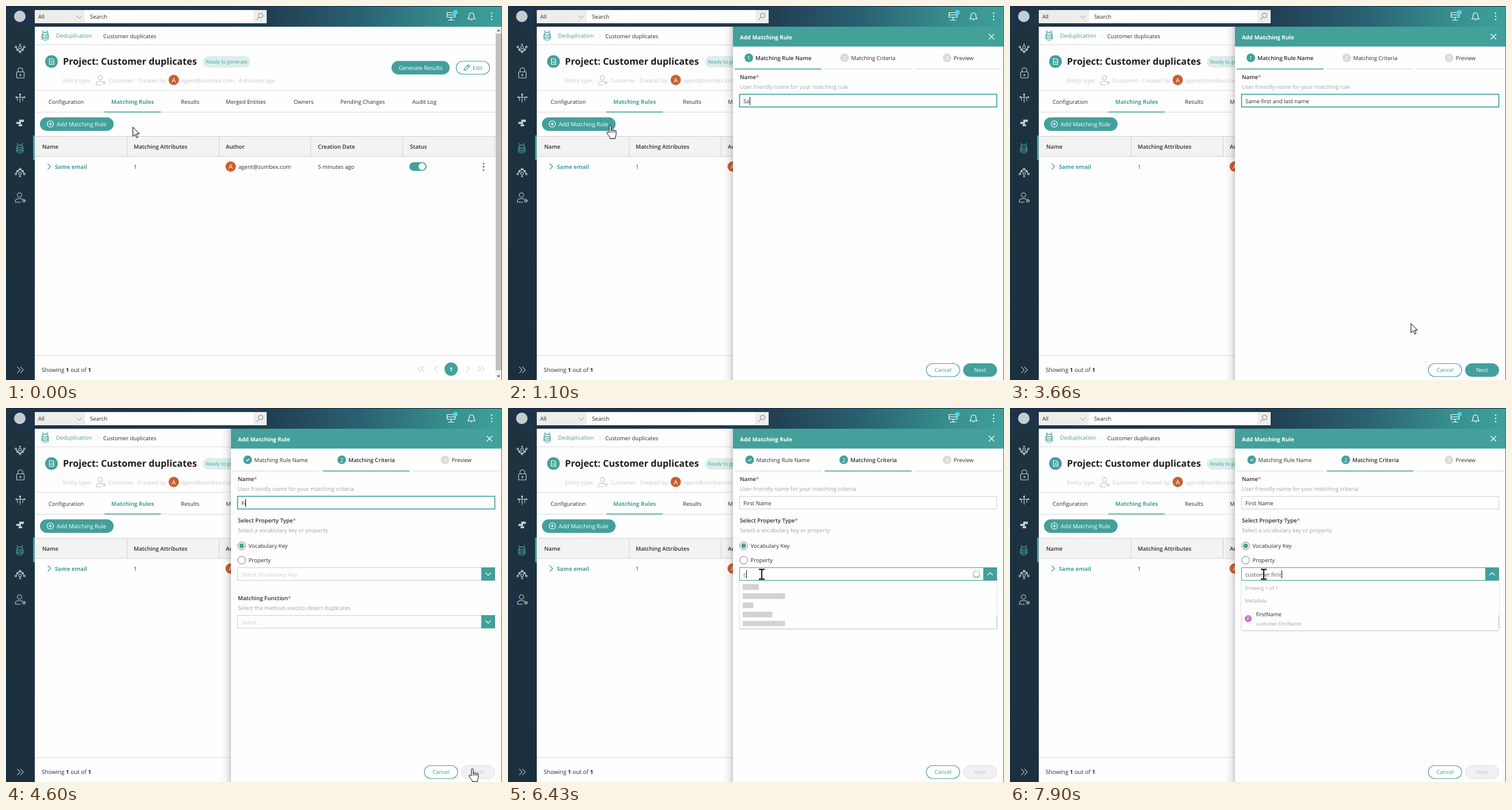
These frames come from a looping animation (862 by 650 pixels, 8000 ms). An HTML page:

```html
<!DOCTYPE html>
<html lang="en">
<head>
<meta charset="utf-8">
<title>Add Matching Rule</title>
<style>
html, body { margin: 0; width: 100%; height: 100%; overflow: hidden; background: #fefefe; }
svg { display: block; width: 862px; height: 650px; }
text { font: 9.6px "Open Sans", "Noto Sans", sans-serif; fill: #2d2d2d; white-space: pre; text-rendering: geometricPrecision; }
.b { font-weight: 600; font-size: 9.7px; }
.h { font-weight: 700; font-size: 9.7px; }
.sub { fill: #a3a3a3; }
.hint { fill: #cfcfcf; }
.meta { fill: #c9c9c9; }
.small { font-size: 8.5px; fill: #a0a0a0; }
.mid { text-anchor: middle; }
.teal { fill: #43a09a; }
.white { fill: #fff; }
.req { fill: #e8585c; }
.rule { stroke: #dcdcdc; }
.line { fill: none; stroke: #43a09a; stroke-width: 1.2; }
.icon { fill: none; stroke: #c9d0d4; stroke-width: 1.1; }
.icon .solid { fill: #c9d0d4; stroke: none; }
.w { fill: none; stroke: #fff; stroke-width: 1.2; }
.box { fill: #fefefe; stroke: #cfcfcf; }
</style>
</head>
<body>
<svg viewBox="0 0 862 650">
<defs>
  <linearGradient id="bar"><stop stop-color="#1e3246"/><stop offset=".52" stop-color="#213c50"/><stop offset=".72" stop-color="#296373"/><stop offset=".9" stop-color="#38918f"/><stop offset="1" stop-color="#3da09b"/></linearGradient>
  <linearGradient id="side" x2="0" y2="1"><stop stop-color="#1d3340"/><stop offset="1" stop-color="#1b2f3e"/></linearGradient>
  <filter id="shadow" x="-10%" y="-10%" width="120%" height="130%"><feDropShadow dx="0" dy="1" stdDeviation="1.5" flood-opacity=".25"/></filter>
  <linearGradient id="edge"><stop stop-color="#000" stop-opacity="0"/><stop offset=".6" stop-color="#000" stop-opacity=".05"/><stop offset="1" stop-color="#000" stop-opacity=".18"/></linearGradient>
  <g id="hive"><path d="M-2.500-5C-3-7-4-8-5.500-8M2.500-5C3-7 4-8 5.500-8"/><ellipse cy="-3" rx="5" ry="2.300"/><path d="M-5-3v3c0 3 10 3 10 0v-3M-5.500 0c-1 2-.5 3 0 3.500 2 2.200 9 2.200 11 0 .5-.5 1-1.500 0-3.500M-5.500 4v2.500c2 2.500 9 2.500 11 0V4"/></g>
  <g id="hub"><circle r="2.300"/><path d="M-7-1C-6 3-4 5 0 7.500 4 5 6 3 7-1"/><g class="solid"><circle cx="-7.500" cy="-1" r="1.500"/><circle cx="7.500" cy="-1" r="1.500"/><circle cx="-4.500" cy="4" r="1.400"/><circle cx="4.500" cy="4" r="1.400"/><circle cy="7.500" r="1.700"/><circle cy="-5" r="1"/></g></g>
  <g id="person"><circle cy="-4.500" r="3.800"/><path d="M-7 8V5.500C-7 1 3 1 5 3M-7 8H2"/></g>
  <g id="avatar"><circle r="9" fill="#c9602f"/><text class="white mid" y="4" style="font-size:11px">A</text></g>
  <g id="dots"><circle cy="-5.500" r="1.200"/><circle r="1.200"/><circle cy="5.500" r="1.200"/></g>
  <path id="chev" d="M-2.500-5 2.500 0-2.500 5"/>
  <g id="spin"><circle r="5.700" class="line" stroke-dasharray="15 1.600 1.600 1.600 1.600 1.600 1.600 1.600 1.600 1.600 1.600 1.600 1.600 1.600"/></g>
</defs>

<!-- page -->
<rect width="862" height="650" fill="#fefefe"/>
<rect width="862" height="36" fill="url(#bar)"/>
<rect y="36" width="50" height="614" fill="url(#side)"/>
<rect width="862" height="1" fill="#172230"/>
<circle cx="24" cy="18" r="10" fill="#c5cdd2"/>
<rect x="50" y="7" width="87" height="23" fill="#ededec"/>
<rect x="137" y="7" width="293" height="23" fill="#fefefe"/>
<rect x="430" y="7" width="23" height="23" fill="#ededec"/>
<text x="56" y="21.500" fill="#555">All</text><text x="146" y="22">Search</text>
<path d="M122.500 17l4.500 4.500 4.500-4.500" fill="none" stroke="#8a8a8a"/>
<g fill="none" stroke="#667b80"><circle cx="442.500" cy="16.500" r="4"/><path d="M439.500 19.500l-4 4.500"/></g>
<g class="w"><path d="M766.500 11.500h14v4h-14zM766.500 15.500h14v4h-14zM773.500 20v4M768 24.500h11"/>
<path d="M803 22.500h12c-2-1.500-1.500-4-2-7-.5-2.500-2-3.500-4-3.500s-3.500 1-4 3.500c-.5 3 0 5.500-2 7zM807.500 24.500h3"/></g>
<circle cx="781" cy="11" r="4" fill="#45d7ea"/>
<use href="#dots" x="844" y="18" fill="#fff"/>

<g class="icon">
  <use href="#hub" x="24.500" y="72"/>
  <rect x="18.500" y="114.500" width="13" height="10.500" rx="1"/><path d="M21 114v-3a4 3.500 0 0 1 8 0v3M23 120h4M25 118v4"/>
  <path d="M17 158.500h16M24.500 152v16M20 158v7M29 158v7"/><g class="solid"><circle cx="24.500" cy="154" r="1.700"/><circle cx="18" cy="158.500" r="1.500"/><circle cx="32" cy="158.500" r="1.500"/></g>
  <path class="solid" d="M23 197.500h8v4h-8zM18 201.500h8v3.500h-8zM22 205.500h6v3.500h-6z"/>
  <use href="#hub" transform="translate(24.500 291) scale(1 -1)"/>
  <use href="#person" x="23.500" y="333"/><circle cx="31" cy="338.500" r="2" stroke-dasharray="1.200 .5" stroke-width="2"/>
  <path d="M19.500 627l5 5.500-5 5.500M25 627l5 5.500-5 5.500"/>
</g>
<use href="#hive" class="line" x="24" y="247"/>
<rect x="47" y="225" width="3" height="43" class="teal"/>

<use href="#hive" class="line" x="68" y="51"/>
<text x="87" y="55" class="teal">Deduplication</text><use href="#chev" transform="translate(159.500 52) scale(.7)" class="icon"/><text x="169" y="55.500">Customer duplicates</text>
<path class="rule" d="M50 67.500h801M50 146.500h801M50 184.500h801M50 607.500h801"/>
<circle cx="79" cy="96.500" r="11" class="teal"/><path class="w" d="M75.500 91.500h5l2.500 2.500v7.500h-7.500zM77.500 96h4M77.500 98.500h4"/>
<text x="99" y="102" class="h" style="font-size:16.200px;fill:#1d1d1d">Project: Customer duplicates</text>
<rect x="342" y="87" width="82.500" height="20" rx="10" fill="#dbeeec"/><text x="347.500" y="100" class="small" style="fill:#43a09a">Ready to generate</text>
<text x="99" y="132.500" class="meta">Entity type:</text>
<g fill="none" stroke="#c4c4c4" stroke-width="1.200"><use href="#person" x="164" y="129"/><path d="M167 133.500h7M170.500 130v7"/></g>
<text x="178" y="132.500" class="meta">Customer</text><text x="229" y="132.500" class="meta">Created by:</text><use href="#avatar" x="291.500" y="128.500"/>
<text x="305" y="132.500" class="meta">agent@zumbex.com,</text><text x="404" y="132.500" class="meta">4 minutes ago</text>
<rect x="670" y="95.500" width="101" height="23.500" rx="11.800" class="teal"/><text x="720.500" y="111" class="white mid">Generate Results</text>
<rect x="782.500" y="96" width="58" height="22.500" rx="11.300" class="line"/><path class="line" d="M796 112l1-3.500 6.500-6.500 2.500 2.500-6.500 6.500zM802 103.500l2.500 2.500"/><text x="811" y="111" class="teal">Edit</text>

<text x="74" y="169.500">Configuration</text><text x="183" y="169.500" class="h teal">Matching Rules</text><text x="304" y="169.500">Results</text><text x="382" y="169.500">Merged Entities</text><text x="500" y="169.500">Owners</text><text x="581" y="169.500">Pending Changes</text><text x="706" y="169.500">Audit Log</text>
<rect x="171" y="183.500" width="98" height="1.600" class="teal"/>
<rect x="59" y="193.500" width="128" height="23.500" rx="11.800" class="teal"/><circle cx="77" cy="205" r="5.500" class="w"/><path class="w" d="M74 205h6M77 202v6"/><text x="88" y="209" class="white" style="font-size:9.900px">Add Matching Rule</text>

<path d="M50 226.500h799.500v35H50M210.500 226.500v35M370.500 226.500v35M529.500 226.500v35M689.500 226.500v35" fill="#f3f3f3" stroke="#d0d0d0"/>
<g class="head"><text x="63" y="247.500" class="b">Name</text><text x="222" y="247.500" class="b">Matching Attributes</text><text x="382" y="247.500" class="b">Author</text><text x="542" y="247.500" class="b">Creation Date</text><text x="702" y="247.500" class="b">Status</text></g>
<use href="#chev" class="line" x="75" y="279"/><text x="85" y="282.500" class="h teal">Same email</text><text x="222" y="282.500">1</text><use href="#avatar" x="390.500" y="279"/><text x="404" y="282.500">agent@zumbex.com</text><text x="542" y="282.500">5 minutes ago</text>
<rect x="701" y="271.500" width="30" height="15" rx="7.500" class="teal"/><circle cx="723" cy="279" r="6" fill="#fff"/>
<use href="#dots" x="830" y="279.500" fill="#444"/>

<text x="62" y="635.500" style="font-size:10px">Showing <tspan class="h">1</tspan> out of <tspan class="h">1</tspan></text>
<path d="M721 626l-5 5 5 5M727 626l-5 5 5 5M750 626l-5 5 5 5M800 626l5 5-5 5M820 626l5 5-5 5M826 626l5 5-5 5" fill="none" stroke="#c2c2c2"/>
<circle cx="773.500" cy="631" r="11.500" class="teal"/><text x="773.500" y="634.500" class="h white mid">1</text>
<rect x="851" y="36" width="11" height="614" fill="#f1f1f1"/><rect x="851" y="48" width="10" height="585" fill="#c1c1c1"/>
<path d="M853 44l3-3.500 3 3.500zM853 642l3 3.500 3-3.500z" fill="#666"/>

<!-- side panel -->
<g id="panel">
  <rect x="373" y="36" width="18" height="614" fill="url(#edge)"/>
  <rect x="391" y="36" width="471" height="614" fill="#fefefe"/><rect x="391" y="36" width="471" height="34.500" class="teal"/>
  <text x="403" y="57.500" class="h white">Add Matching Rule</text><path class="w" d="M835.500 48.500l9.500 9.500M845 48.500l-9.500 9.500"/>
  <g id="steps1"></g><g id="steps2"></g>
  <text x="403" y="127" class="b">Name<tspan class="req">*</tspan></text><text id="help" x="403" y="144" class="sub"></text>
  <rect id="nameBox" x="402.500" y="153.500" width="447" height="22" class="box"/>
  <text id="name" x="409" y="168.500"></text>
  <g id="criteria">
    <text x="403" y="198.500" class="b">Select Property Type<tspan class="req">*</tspan></text><text x="403" y="215.500" class="sub">Select a vocabulary key or property</text>
    <circle cx="409.500" cy="239.500" r="6.700" fill="#fff" stroke="#777"/><circle cx="409.500" cy="239.500" r="4.200" class="teal"/><text x="421.500" y="243">Vocabulary Key</text>
    <circle cx="409.500" cy="264.500" r="6.700" fill="#fff" stroke="#777"/><text x="421.500" y="268">Property</text>
    <rect id="keyBox" x="402.500" y="277.500" width="447" height="22" class="box"/><rect x="826" y="277" width="24" height="23" class="teal"/>
    <path id="keyArrow" class="w"/><text id="keyHint" x="409" y="292.500" class="hint">Select Vocabulary Key</text><text id="key" x="409" y="292.500" style="fill:#555"></text>
    <text x="403" y="334" class="b">Matching Function<tspan class="req">*</tspan></text><text x="403" y="351" class="sub">Select the method used to detect duplicates</text>
    <rect x="402.500" y="360.500" width="447" height="22" class="box"/><rect x="826" y="360" width="24" height="23" class="teal"/>
    <path class="w" d="M833.500 369.500l4.500 4.500 4.500-4.500"/><text x="409" y="376" class="hint">Select...</text>
    <use id="spinA" href="#spin"/><use id="spinB" href="#spin"/>
  </g>
  <g id="loading">
    <rect x="402.500" y="301" width="447" height="82" fill="#fefefe" filter="url(#shadow)"/>
    <path d="M408 306h28v10h-28zM408 322h73.500v10H408zM408 338h18.500v10H408zM408 354h51.500v10H408zM408 370h73.500v9H408z" fill="#d3d3d3"/>
  </g>
  <g id="result">
    <rect x="402.500" y="301" width="447" height="85" fill="#fefefe" filter="url(#shadow)"/>
    <text x="408" y="315.500" class="small">Showing 1 of 1</text><text x="408" y="337.500" class="small">Metadata</text>
    <circle cx="414" cy="366" r="6" fill="#ca72c2"/><text x="414" y="369" class="small mid" style="fill:#fff">F</text>
    <text x="427.500" y="362">firstName</text><text x="427.500" y="378" class="small">customer.firstName</text>
  </g>
  <path id="caret" stroke="#111" d="M.5 0v14"/>
  <rect x="727" y="621.500" width="58" height="22.500" rx="11.300" class="line"/><text x="756" y="636" class="teal mid">Cancel</text>
  <rect id="next" x="791.500" y="621.500" width="58" height="22.500" rx="11.300"/><text id="nextText" x="820.500" y="636" class="mid">Next</text>
</g>
<path d="M861.500 0v650" stroke="#59646a"/>

<g id="cursor" stroke-linejoin="round">
  <path id="arrow" d="M.5.5v16l3.800-3.600 2.600 6 2.500-1.100-2.600-5.800h5z" fill="#fff" stroke="#000"/>
  <path id="hand" d="M-1.600 12V1.400a1.600 1.600 0 0 1 3.200 0V8a1.600 1.600 0 0 1 3 .3 1.600 1.600 0 0 1 3 .6 1.500 1.500 0 0 1 2.800.8V15c0 2.500-1.600 3.400-1.800 7.500H0C0 19-4.600 16-5.600 13c-.8-2 1.300-2.800 2.400-1.500zM1.600 8v4M4.600 8.500V12M7.600 9v3" fill="#fff" stroke="#000"/>
  <path id="beam" d="M-5-8.500h4l1 1 1-1h4M0-8V8M-5 8.500h4l1-1 1 1h4" fill="none" stroke="#000" stroke-width="1.800"/>
</g>
</svg>
<script>
const $ = id => document.getElementById(id);
const show = (id, on) => $(id).style.display = on ? '' : 'none';
const progress = (t, from, to) => Math.min(1, Math.max(0, (t - from) / (to - from)));
const easeOut = p => 1 - (1 - p) ** 3;
const TEAL = '#43a09a', LOOP = 8000;
const FOCUS = 610, STEP2 = 4200, OPEN = 6200, FOUND = 7830;

function step(n, cx, label, current) {
  const active = n === current, done = n < current, x = 394 + (n - 1) * 156.5;
  const mark = done
    ? `<path class="w" d="M${cx - 2.5} 90l2 2 3.500-3.500"/>`
    : `<text x="${cx}" y="93.500" class="white mid">${n}</text>`;
  return `<circle cx="${cx}" cy="90" r="7.500" fill="${active || done ? TEAL : '#dadada'}"/>${mark}
    <text x="${cx + 11.5}" y="94" class="${active ? 'b' : ''}">${label}</text>
    <rect x="${x}" y="108.700" width="151" height="1.600" fill="${active ? TEAL : '#e2e2e2'}"/>`;
}
const steps = (current, a, b) => step(1, a, 'Matching Rule Name', current) +
  step(2, b, 'Matching Criteria', current) + step(3, 763, 'Preview', current);
$('steps1').innerHTML = steps(1, 418.5, 585);
$('steps2').innerHTML = steps(2, 420, 583.5);

// Each burst is [start, gap, count]; the caret blinks from the latest key press.
function type(t, text, focus, bursts) {
  let count = 0, last = focus;
  for (const [start, gap, max] of bursts) {
    const n = Math.min(max, Math.floor((t - start) / gap) + 1);
    if (n > 0) { count += n; last = start + (n - 1) * gap; }
  }
  return { text: text.slice(0, count), caret: t >= focus && (t - last) % 460 < 230 };
}

// Cursor moves: [start, end, x, y]
const moves = [[100, 360, 177.5, 208], [3400, 4000, 810.5, 627], [5500, 6150, 441, 289]];
function pointer(t) {
  let x = 220, y = 210;
  for (const [from, to, nx, ny] of moves) {
    const p = easeOut(progress(t, from, to));
    x += (nx - x) * p;
    y += (ny - y) * p;
  }
  const overAdd = t < 3260 && x < 187 && y < 217;
  const overNext = x > 791 && y > 621;
  const overKey = t > STEP2 && x < 826 && y > 277 && y < 300;
  $('cursor').setAttribute('transform', `translate(${x} ${y})`);
  show('hand', overAdd || overNext);
  show('beam', overKey);
  show('arrow', !overAdd && !overNext && !overKey);
}

function outline(id, on, width) {
  $(id).style.stroke = on ? TEAL : '';
  $(id).style.strokeWidth = on ? width : 1;
}

function spinner(id, y, t, on) {
  show(id, on);
  $(id).setAttribute('transform', `translate(814 ${y}) rotate(${t * 0.45 % 360})`);
}

function draw(t) {
  const slide = progress(t, 480, 640), second = t >= STEP2, open = t >= OPEN;
  show('panel', t >= 500);
  $('panel').setAttribute('transform', `translate(${471 * (1 - easeOut(slide))} 0)`);
  $('panel').setAttribute('opacity', 1 - (1 - slide) ** 1.4);

  show('steps1', !second);
  show('steps2', second);
  show('criteria', second);
  $('help').textContent = `User friendly name for your matching ${second ? 'criteria' : 'rule'}`;

  const name = second
    ? type(t, 'First Name', STEP2, [[4460, 1, 1], [4600, 82.5, 9]])
    : type(t, 'Same first and last name', FOCUS, [[1000, 76, 11], [1860, 78, 11], [2730, 70, 2]]);
  const key = type(t, 'customer.first', OPEN, [[6360, 80, 14]]);
  $('name').textContent = name.text;
  $('key').textContent = key.text;
  outline('nameBox', t >= FOCUS && !open, 1.7);
  outline('keyBox', open, 1);
  show('keyHint', !key.text);
  $('keyArrow').setAttribute('d', open ? 'M833.5 290.5l4.5-4.5 4.5 4.5' : 'M833.5 286.5l4.5 4.5 4.5-4.5');

  const [id, field, top] = open ? ['key', key, 282] : ['name', name, 158];
  show('caret', field.caret);
  const end = field.text ? $(id).getComputedTextLength() : 0;
  $('caret').setAttribute('transform', `translate(${Math.round(409 + end)} ${top})`);

  spinner('spinA', 288.5, t, t < 4260 || t >= 6360 && t < FOUND);
  spinner('spinB', 371.5, t, t < 4230);
  show('loading', open && t < FOUND);
  show('result', t >= FOUND);

  const ready = !second && name.text;
  $('next').setAttribute('fill', ready ? TEAL : '#f1f1f1');
  $('next').setAttribute('stroke', ready ? TEAL : '#dedede');
  $('nextText').style.fill = ready ? '#fff' : '#c8c8c8';
  pointer(t);
}

const begin = performance.now();
function tick() {
  draw((performance.now() - begin) % LOOP);
  requestAnimationFrame(tick);
}
tick();
</script>
</body>
</html>
```
